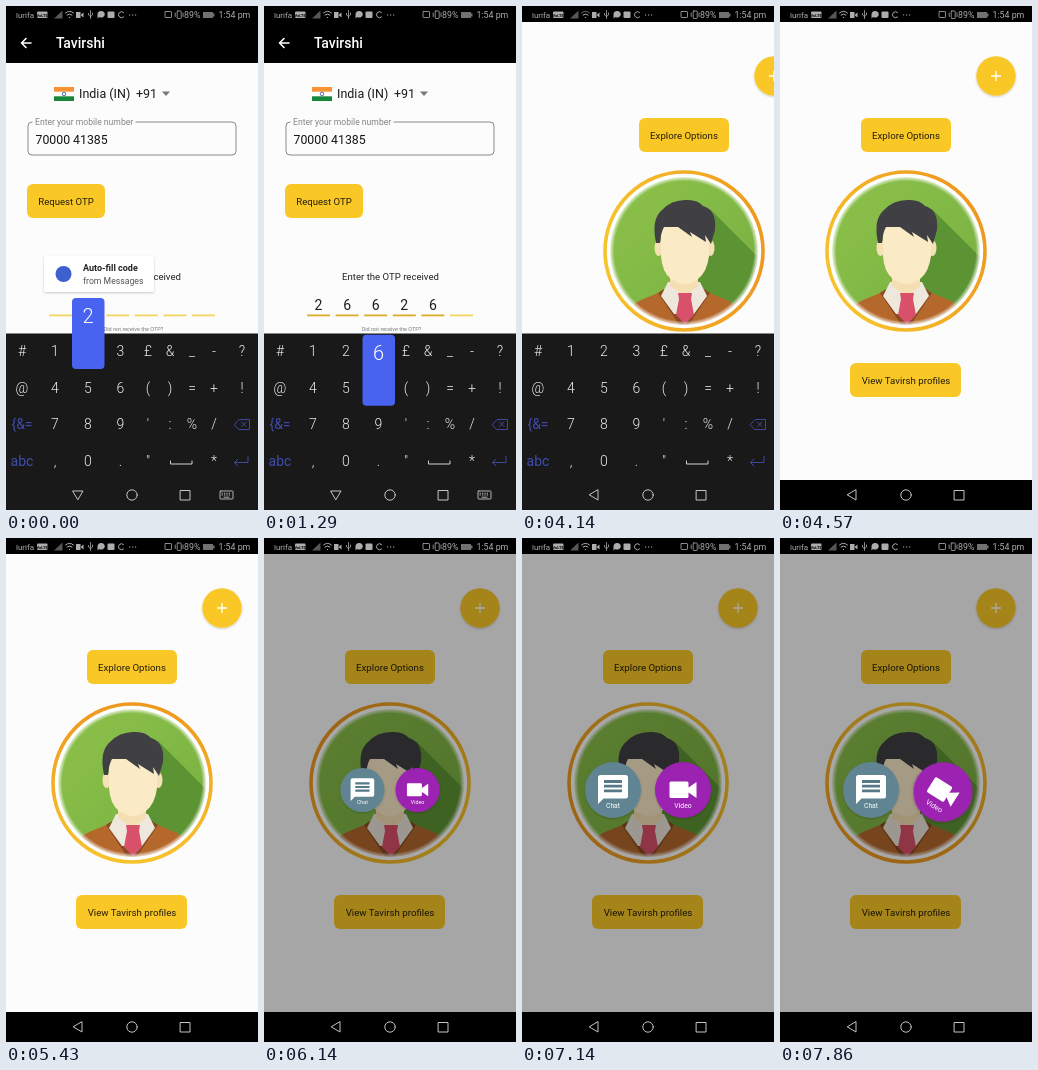
Recreate the animation shown at these times as an HTML page. Size 252 by 504 pixels, loop 8000 ms.

```html
<!DOCTYPE html>
<html lang="en">
<head>
<meta charset="utf-8">
<title>Sign-in demo</title>
<style>
  html, body { margin: 0; width: 100%; height: 100%; overflow: hidden; background: #fafafa; }
  svg { display: block; width: 100vw; height: 100vh; font-family: Roboto, sans-serif; }
  .mid { text-anchor: middle; }
  .line { fill: none; stroke-linecap: round; stroke-linejoin: round; }
</style>
</head>
<body>
<svg viewBox="0 0 252 504">
  <defs>
    <filter id="shadow" x="-20%" y="-20%" width="140%" height="150%">
      <feDropShadow dx="0" dy="1" stdDeviation="1.3" flood-opacity=".2"/>
    </filter>
    <linearGradient id="ringFill" gradientUnits="userSpaceOnUse" x1="45" y1="245" x2="207" y2="245">
      <stop offset="0" stop-color="#ee981f"/><stop offset="1" stop-color="#f7c32c"/>
    </linearGradient>
    <radialGradient id="softEdge">
      <stop offset=".93" stop-color="#fff" stop-opacity="0"/><stop offset="1" stop-color="#fff"/>
    </radialGradient>
    <linearGradient id="green" x2="1" y2="1">
      <stop offset="0" stop-color="#8cc24a"/><stop offset="1" stop-color="#78ae40"/>
    </linearGradient>
    <clipPath id="face"><circle cx="126" cy="245" r="74"/></clipPath>
  </defs>
  <rect width="252" height="504" fill="#fcfcfc"/>

  <g id="otp">
    <rect width="252" height="57" fill="#000"/>
    <path class="line" d="M25 37H15.5M20 32.5L15.5 37L20 41.500" stroke="#fff" stroke-width="1.6"/>
    <text x="50" y="42" font-size="14" font-weight="500" fill="#fff">Tavirshi</text>
    <rect x="48" y="81" width="20" height="14" fill="#fff"/>
    <rect x="48" y="81" width="20" height="4.700" fill="#f79235"/>
    <rect x="48" y="90.300" width="20" height="4.700" fill="#15883b"/>
    <circle cx="58" cy="88" r="1.800" fill="none" stroke="#334a9c" stroke-width=".8"/>
    <text y="92" font-size="12.500" fill="#1b1b1b"><tspan x="73">India (IN)</tspan><tspan x="130">+91</tspan></text>
    <path d="M156 85.500h8l-4 4.500z" fill="#777"/>
    <rect x="22" y="116" width="208" height="33" rx="4" fill="none" stroke="#8a8a8a"/>
    <rect x="26.500" y="113" width="103" height="6" fill="#fcfcfc"/>
    <text x="29" y="119" font-size="8.600" fill="#858585">Enter your mobile number</text>
    <text x="29.500" y="137.500" font-size="12.300" fill="#151515">70000 41385</text>
    <rect x="21" y="178" width="78" height="34" rx="6" fill="#fac826"/>
    <text class="mid" x="60" y="198.500" font-size="9.600" fill="#221c08">Request OTP</text>
    <text class="mid" x="126.500" y="274" font-size="9.600" fill="#222">Enter the OTP received</text>
    <g id="slots"></g>
    <text class="mid" x="127.500" y="325" font-size="5.500" fill="#777">Did not receive the OTP?</text>
    <g id="toast">
      <rect x="38" y="250" width="110" height="36" rx="2" fill="#fff" filter="url(#shadow)"/>
      <circle cx="57.500" cy="268" r="8" fill="#3d5fd0"/>
      <text x="77" y="265" font-size="9" font-weight="700" fill="#222">Auto-fill code</text>
      <text x="77" y="278" font-size="8.700" fill="#555">from Messages</text>
    </g>
  </g>

  <g id="home">
    <rect width="252" height="504" fill="#fcfcfc"/>
    <g fill="#fac826">
      <circle cx="216" cy="70" r="19.700" filter="url(#shadow)"/>
      <rect x="81" y="112" width="90" height="34" rx="6"/>
      <rect x="70" y="357" width="111" height="34" rx="6"/>
    </g>
    <path d="M211 70h10M216 65v10" stroke="#fff" stroke-width="1.300"/>
    <g class="mid" font-size="9.700" fill="#221c08">
      <text x="126" y="132.500">Explore Options</text>
      <text x="126" y="377.500">View Tavirsh profiles</text>
    </g>
    <circle cx="126" cy="245" r="79" fill="#fff" stroke="url(#ringFill)" stroke-width="3.600"/>
    <g clip-path="url(#face)">
      <rect x="52" y="171" width="148" height="148" fill="url(#green)"/>
      <path d="M152 203L205 256V319H138V270z" fill="#5d9433"/>
      <path d="M66 320Q69 300 83 294L110 283H142L169 294Q183 300 186 320z" fill="#b5682c"/>
      <path d="M106 283L126 316L146 283L152 287L130 320H122L100 287z" fill="#8a4a22"/>
      <path d="M110 276L103 290L116 308H136L149 290L142 276z" fill="#ede7dc"/>
      <path d="M112 262H140V280L127 290L112 280z" fill="#f5deb2"/>
      <path d="M120 287H134L133 293L136 309L127 318L118 309L121 293z" fill="#d9506a"/>
      <ellipse cx="100.500" cy="242" rx="4" ry="8" fill="#f6e0b6"/>
      <ellipse cx="152.500" cy="242" rx="4" ry="8" fill="#f6e0b6"/>
      <path d="M103 215H151V250Q149 266 140 273Q127 283 113 273Q104 266 103 250z" fill="#faeac6"/>
      <path d="M98 237Q93 213 104 204Q114 193 130 194Q140 194 145 200Q159 204 157 224L153 238L147 229L148 236L132 226L134 231L120 221H106Q103 226 102 237z" fill="#403f44"/>
    </g>
    <circle cx="126" cy="245" r="75" fill="url(#softEdge)"/>
  </g>

  <rect id="dim" y="16" width="252" height="458"/>
  <g id="chat">
    <circle r="28" fill="#618491" filter="url(#shadow)"/>
    <path d="M-12.500 -15H12.500Q15 -15 15 -12.500V6Q15 8.500 12.500 8.500H-9.500L-15 14V-12.500Q-15 -15 -12.500 -15z" fill="#fff"/>
    <path d="M-9 -8.500H9M-9 -3.800H9M-9 .9H9" stroke="#557987" stroke-width="2.800"/>
    <text class="mid" y="18" font-size="6.800" fill="#fff">Chat</text>
  </g>
  <g id="video">
    <circle r="28" fill="#9c20b2" filter="url(#shadow)"/>
    <path d="M-12 -8.500H4Q5.500 -8.500 5.500 -7V-2.500L13.500 -8V8L5.500 2.500V6.500Q5.500 8 4 8H-12Q-13.500 8 -13.500 6.500V-7Q-13.500 -8.500 -12 -8.500z" fill="#fff"/>
    <text class="mid" y="18" font-size="6.800" fill="#fff">Video</text>
  </g>

  <g id="status" fill="#adadad">
    <rect width="252" height="16" fill="#000"/>
    <text x="10" y="12" font-size="8">lurifa</text>
    <g font-size="8.800">
      <text x="178" y="12">89%</text>
      <text x="212.500" y="12">1:54 pm</text>
    </g>
    <rect x="31" y="5.500" width="10.500" height="6.500" rx="1"/>
    <text class="mid" x="36.200" y="10.500" font-size="4" font-weight="700" fill="#000">VoLTE</text>
    <path d="M48 12.500L56.500 4.500V12.500z" opacity=".5"/>
    <g class="line" stroke="#adadad">
      <path id="wifiTop" d="M59.500 7Q63.500 3.500 67.500 7"/>
      <path d="M61 9Q63.500 7 66 9M63.300 11.500h.4"/>
      <path d="M84.500 4.500V12.500M82.500 7.500V9L84.500 10.500L86.500 9V7" stroke-width=".8"/>
      <path d="M117.500 6.500A3 3 0 1 0 117.500 11"/>
      <rect x="159" y="5.500" width="6.500" height="6" rx=".6" stroke-width=".8"/>
      <rect x="171.200" y="5" width="4" height="7.500" rx=".6" stroke-width=".8"/>
      <path d="M169.200 7V10.500M177 7V10.500" stroke-width=".8"/>
    </g>
    <path d="M70 6h4.500v6H70zM75 8.500L77.500 6.500V11.500L75 9.500z"/>
    <path d="M95 5A3.700 3.300 0 1 1 93 11L91.500 12.500V8Q92 5 95 5z"/>
    <rect x="101.500" y="5.500" width="7" height="6.500" rx="1"/>
    <path d="M123 9h1.200M126 9h1.200M129 9h1.200" stroke="#adadad" stroke-width="1.200"/>
    <path d="M197 6h10v1.500h1.500v3H207V12h-10z" opacity=".65"/>
  </g>

  <g id="keyboard">
    <rect y="327.500" width="252" height="177" fill="#191919"/>
    <g id="keys" class="mid" font-size="14" font-weight="300"></g>
    <path class="line" d="M164.500 455V458H186V455" stroke="#e6e6e6" stroke-width=".9"/>
    <g class="line" stroke="#3c499f">
      <path d="M228.500 418.500L233 413.500H243.500V423.500H233zM235.500 416L240 420.500M240 416L235.500 420.500"/>
      <path d="M242 450V456.500H228.500M232 453L228.500 456.500L232 460"/>
    </g>
    <g id="popup">
      <rect x="-16" y="-53" width="32.500" height="71" rx="4" fill="#4863ef"/>
      <text id="popupText" class="mid" y="-28" font-size="20" font-weight="300" fill="#fff"></text>
    </g>
  </g>

  <g id="nav">
    <rect id="navBack" y="474" width="252" height="30"/>
    <g class="line" stroke="#c4c4c4">
      <path id="backKey" d="M67 485H77L72 493.500z"/>
      <circle cx="126" cy="489" r="5.200"/>
      <rect x="174.500" y="484.500" width="9.500" height="9.500"/>
      <g id="imeKey">
        <rect x="214" y="485" width="13" height="8" rx=".8" stroke-width=".9"/>
        <path d="M216 487.300h9M216 489h9" stroke-dasharray=".4 2"/>
        <path d="M218 491.200h5" stroke-width=".9"/>
      </g>
    </g>
  </g>
</svg>
<script>
const LOOP = 8000, STEP = LOOP / 56;
const $ = id => document.getElementById(id);
const clamp = v => Math.min(1, Math.max(0, v));
const span = (t, from, length) => clamp((t - from) / length);
const easeOut = p => 1 - (1 - p) ** 2;
const show = (id, on) => $(id).setAttribute('display', on ? 'inline' : 'none');
const move = (id, value) => $(id).setAttribute('transform', value);

function add(parent, tag, attrs, text = '') {
  const node = document.createElementNS('http://www.w3.org/2000/svg', tag);
  for (const name in attrs) node.setAttribute(name, attrs[name]);
  node.textContent = text;
  parent.append(node);
  return node;
}

const columns = [16, 49, 82, 114.5, 142, 164, 186, 208, 236];
const rows = ['# 1 2 3 £ & _ - ?', '@ 4 5 6 ( ) = + !', "{&= 7 8 9 ' : % /", 'abc , 0 . "   *'];
const keyAt = {};
rows.forEach((row, r) => row.split(' ').forEach((label, c) => {
  if (!label) return;
  const x = columns[c], y = 345 + r * 36.7;
  keyAt[label] = [x, y];
  const wide = label.length > 1;
  add($('keys'), 'text', { x, y: y + 5, fill: wide ? '#3f4cae' : '#ececec', 'font-weight': wide ? 400 : 300 }, label);
}));

const slots = [...Array(6)].map((_, i) => {
  const x = 43 + i * 28.6;
  return {
    line: add($('slots'), 'rect', { x, y: 308.5, width: 23, height: 1.8 }),
    digit: add($('slots'), 'text', { x: x + 11.5, y: 304, class: 'mid', 'font-size': 14, fill: '#1b1b1b' })
  };
});

// time, code so far, pressed key
const typing = [
  [0, '', '2'], [140, '2', '6'], [285, '26', '6'], [425, '266', '2'], [570, '2662', ''],
  [995, '2662', '6'], [1140, '26626', '6'], [1425, '26626', ''],
  [1570, '26626', '2'], [1710, '266262', '2'], [1855, '266262', '']
];

function drawTyping(t) {
  const [, code, key] = typing.filter(entry => entry[0] <= t).pop();
  slots.forEach(({ line, digit }, i) => {
    digit.textContent = code[i] || '';
    line.setAttribute('fill', code[i] ? '#d9ac2b' : '#f3d566');
  });
  show('toast', !code);
  show('popup', key);
  if (key) {
    move('popup', `translate(${keyAt[key]})`);
    $('popupText').textContent = key;
  }
}

function drawMenu(t) {
  const open = easeOut(span(t, 5900, 450));
  const picked = span(t, 7420, 437) ** 2;
  const reach = 35 * open;
  $('dim').setAttribute('opacity', 0.34 * span(t, 5600, 350));
  show('chat', open);
  show('video', open);
  move('chat', `translate(${126 - reach} 252) scale(${open})`);
  move('video', `translate(${126 + reach + 2 * picked} ${252 + 2 * picked}) rotate(${32 * picked}) scale(${open * (1 + 0.06 * picked)})`);
}

function draw(time) {
  const t = Math.floor((time % LOOP + 4) / STEP) * STEP;
  drawTyping(t);
  drawMenu(t);
  const slide = span(t, 3700, 712);
  show('otp', t < 3570);
  show('home', slide);
  move('home', `translate(${252 * (1 - slide) ** 2} 0)`);
  $('ringFill').setAttribute('gradientTransform', `rotate(${110 - t * 0.07} 126 245)`);
  $('wifiTop').setAttribute('opacity', t > 2280 && t < 4560 ? 0.6 : 1);

  const hidden = span(t, 4180, 220);
  show('keyboard', hidden < 1);
  move('keyboard', `translate(0 ${147 * hidden})`);
  $('navBack').setAttribute('fill', hidden < 1 ? '#191919' : '#000');
  const typingNav = t < 3990;
  show('imeKey', typingNav);
  move('backKey', `rotate(${typingNav ? 0 : 90} 72 489)`);
}

const start = performance.now();
function tick(now) {
  draw(Math.max(0, now - start));
  requestAnimationFrame(tick);
}
draw(0);
requestAnimationFrame(tick);
</script>
</body>
</html>
```
